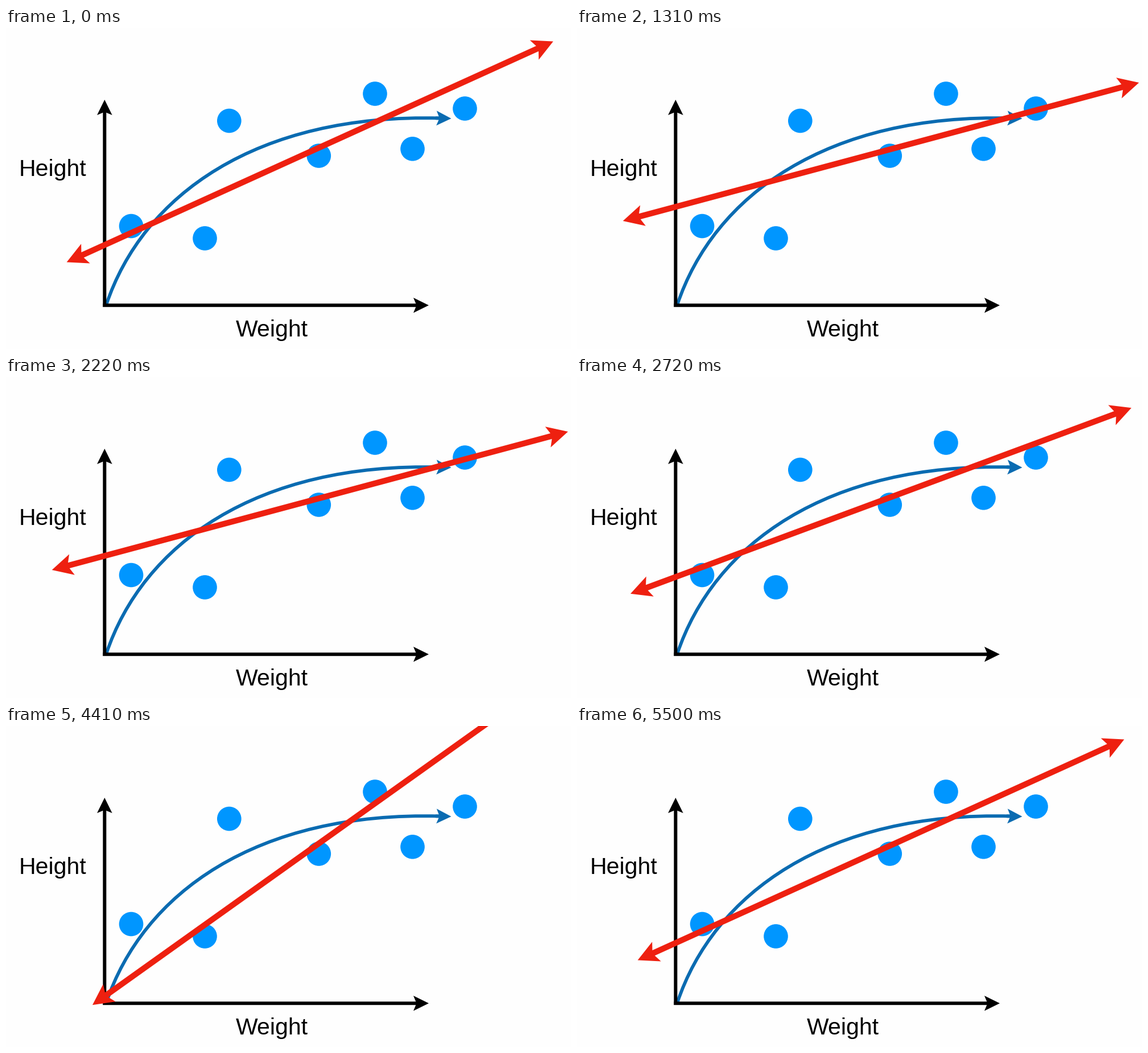
Animation of 993 by 564 pixels, one loop 5.6 s. Source, as a matplotlib script:

```python
import numpy as np
import matplotlib.pyplot as plt
from matplotlib.animation import FuncAnimation
from matplotlib.patches import Circle, PathPatch, Polygon
from matplotlib.path import Path

W, H, DPI = 993, 564, 64
PT = 72 / DPI  # points per pixel
LOOP, INTERVAL = 5600, 40

BLACK, RED = "#000000", "#ee2010"
DOT_BLUE, CURVE_BLUE = "#0096ff", "#0a6bb1"

PIVOT, HALF_LENGTH = np.array([534.2, 217.5]), 469.5
POSES = [10.3, 15.0, 20.35, 24.4, 30.2, 35.5]  # degrees, flat to steep
REST_POSE = 3
FIRST_TURN, TURN_EVERY = 300, 525  # ms

DOTS = [(220, 348), (349.5, 369.5), (392.3, 163), (549.8, 224.5),
        (648.5, 115.5), (714.5, 212.3), (806.5, 141.5)]

fig = plt.figure(figsize=(W / DPI, H / DPI), dpi=DPI, facecolor="#fefefe")
ax = fig.add_axes([0, 0, 1, 1])
ax.set_xlim(0, W)
ax.set_ylim(H, 0)
ax.axis("off")


def half_arrow(tail, tip, width, head, spread):
    """Outline from one side of the tail, around the tip, to the other side."""
    tail, tip = np.array(tail, float), np.array(tip, float)
    along = (tip - tail) / np.hypot(*(tip - tail))
    side = np.array([-along[1], along[0]])
    neck = tip - along * head * 0.84
    barb = tip - along * head
    return [tail + side * width / 2, neck + side * width / 2,
            barb + side * spread, tip, barb - side * spread,
            neck - side * width / 2, tail - side * width / 2]


def add_shape(points, color):
    shape = Polygon(points, closed=True, facecolor=color, linewidth=0)
    return ax.add_patch(shape)


def double_arrow(angle):
    a = np.radians(angle)
    reach = HALF_LENGTH * np.array([np.cos(a), -np.sin(a)])
    style = dict(width=10.3, head=36.5, spread=18.8)
    return (half_arrow(PIVOT, PIVOT + reach, **style)
            + half_arrow(PIVOT, PIVOT - reach, **style))


def pose_at(ms):
    """Swing from rest down to the flattest pose, up to the steepest, and back."""
    turns = int((ms - FIRST_TURN + TURN_EVERY) // TURN_EVERY)
    last = len(POSES) - 1
    return POSES[abs((turns + last - REST_POSE) % (2 * last) - last)]


for dot in DOTS:
    ax.add_patch(Circle(dot, 21.3, facecolor=DOT_BLUE, linewidth=0))

curve = Path([(176, 487), (240, 294.5), (440, 149.5), (764, 158.5)],
             [Path.MOVETO] + [Path.CURVE4] * 3)
ax.add_patch(PathPatch(curve, fill=False, edgecolor=CURVE_BLUE,
                       linewidth=5.8 * PT, capstyle="butt"))
add_shape(half_arrow((755, 158.3), (782.5, 159), 5.8, 26, 13), CURVE_BLUE)

add_shape(half_arrow((173.3, 490), (173.3, 126), 6, 27, 13.3), BLACK)
add_shape(half_arrow((170.3, 487.2), (743, 487.2), 6, 27, 13.3), BLACK)

label = dict(family="Liberation Sans", fontsize=41 * PT, color=BLACK,
             ha="center", va="baseline")
ax.text(81.5, 260, "Height", **label)
ax.text(467.5, 541.5, "Weight", **label)

line = add_shape(double_arrow(POSES[REST_POSE]), RED)
line.set_zorder(5)


def update(frame):
    line.set_xy(double_arrow(pose_at((frame + 0.5) * INTERVAL)))
    return [line]


anim = FuncAnimation(fig, update, frames=LOOP // INTERVAL, interval=INTERVAL,
                     repeat=True, repeat_delay=0, blit=False)
plt.show()
```
